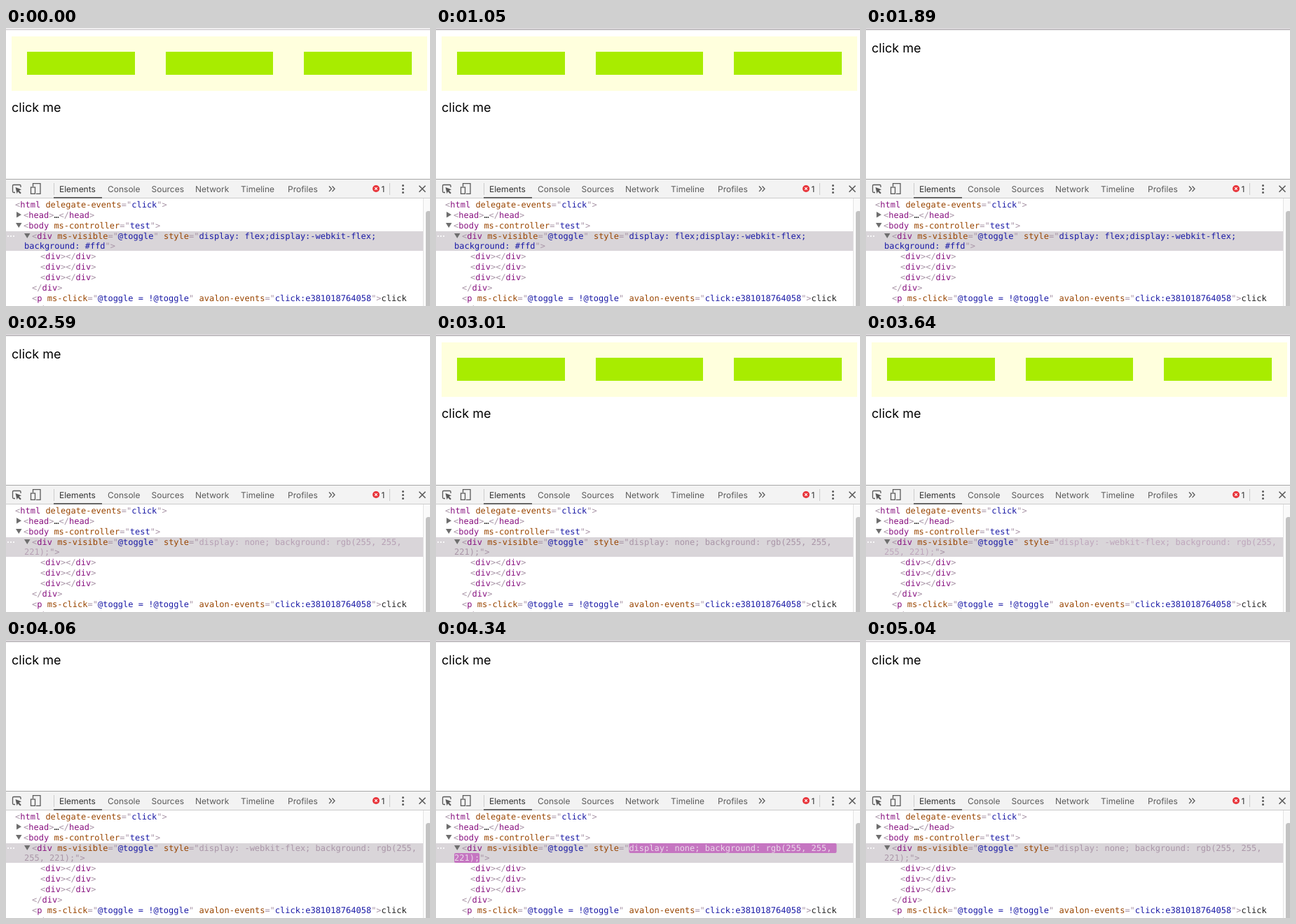
Animation, 605 px wide and 398 px high, one loop 5.11 s. Source, as an HTML page:

```html
<!DOCTYPE html>
<html lang="en">
<head>
<meta charset="utf-8">
<title>Toggle in the inspector</title>
<style>
  html, body { margin: 0; width: 100%; height: 100%; overflow: hidden; background: #fff; }
  svg { display: block; }
  text { white-space: pre; text-rendering: geometricPrecision; }
  .page { font: 18px Inter, sans-serif; fill: #000; }
  .tabs { font: 12px Inter, sans-serif; fill: #5a5a5a; }
  .code { font: 12px "DejaVu Sans Mono", monospace; fill: #222; }
  .b { fill: #a894a6; }
  .t { fill: #881280; }
  .n { fill: #994500; }
  .v { fill: #1a1aa6; }
  .icon { fill: none; stroke: #5a5a5a; stroke-width: 1.3; }
  .arrow { fill: #6e6e6e; }
</style>
</head>
<body>
<svg width="605" height="398" viewBox="0 0 605 398">
  <rect width="605" height="398" fill="#fff"/>
  <rect id="strip" width="605" height="2"/>
  <rect id="edge" y="2" width="605" height="1"/>

  <g id="box">
    <rect x="8" y="12" width="593" height="78" fill="#ffffdd"/>
    <path d="M30 34h154v33H30zM228 34h153v33H228zM425 34h154v33H425z" fill="#a8ec00"/>
  </g>
  <text id="label" class="page" x="8" y="120">click me</text>

  <rect y="216" width="605" height="28" fill="#f3f3f3"/>
  <rect y="216" width="605" height="1" fill="#a8a8a8"/>
  <rect y="243" width="605" height="1" fill="#cccccc"/>
  <rect x="68" y="242" width="69" height="2" fill="#666"/>
  <path d="M68.5 222v17M547.5 222v17" stroke="#ccc"/>
  <g class="icon">
    <path d="M13 235.5H11Q9.500 235.500 9.500 234V226Q9.500 224.500 11 224.500H19.500Q21 224.500 21 226V228"/>
    <path d="M38.500 227V222.700H49V237.300H43"/>
    <rect x="35.500" y="228" width="6" height="9.300"/>
    <path d="M461 226.500l3.500 3.800-3.500 3.800M465.500 226.500l3.500 3.800-3.500 3.800"/>
    <path d="M589.500 225.700l9 9M598.500 225.700l-9 9" stroke-width="1.600"/>
  </g>
  <path d="M13.500 228l8.500 3.200-3.400 1.500 3.200 3.300-1.500 1.500-3.300-3.300-1.400 3z" fill="#5a5a5a"/>
  <g fill="#5a5a5a">
    <circle cx="566.500" cy="225.500" r="1.500"/>
    <circle cx="566.500" cy="230.500" r="1.500"/>
    <circle cx="566.500" cy="235.500" r="1.500"/>
  </g>
  <circle cx="528" cy="230" r="5" fill="#e8343a"/>
  <path d="M526.200 228.200l3.600 3.600M529.800 228.200l-3.600 3.600" stroke="#fff" stroke-width="1.200"/>
  <g id="tabs" class="tabs"></g>

  <rect y="291" width="595" height="28" fill="#d9d5d9"/>
  <g id="flash"></g>
  <g fill="#fff">
    <circle cx="3" cy="298" r="1.100"/>
    <circle cx="7" cy="298" r="1.100"/>
    <circle cx="11" cy="298" r="1.100"/>
  </g>
  <path class="arrow" d="M15 263l7 4.200-7 4.200zM14 279h8.500l-4.250 7zM26 294h8.500l-4.250 7z"/>
  <g id="code" class="code"></g>
  <g id="style" class="code"></g>

  <rect x="595" y="244" width="10" height="154" fill="#fafafa"/>
  <rect x="595" y="244" width="1" height="154" fill="#e4e4e4"/>
  <rect x="599" y="262" width="8" height="150" rx="3.500" fill="#c2c2c2"/>
</svg>
<script>
const LOOP = 5110, CHAR = 7.224, STYLE_X = 37 + 33 * CHAR;
const $ = id => document.getElementById(id);
const esc = s => s.replace(/</g, "&lt;").replace(/>/g, "&gt;");
const span = (cls, s) => `<tspan class="${cls}">${esc(s)}</tspan>`;
const line = (x, y, body) => `<text x="${x}" y="${y}">${body}</text>`;
const open = name => span("b", "<") + span("t", name);
const close = name => span("b", "</") + span("t", name) + span("b", ">");
const end = span("b", ">");
const attr = (name, value) =>
  " " + span("n", name) + span("b", '="') + span("v", value) + span("b", '"');

$("tabs").innerHTML = [
  [76, "Elements"], [145, "Console"], [207.5, "Sources"], [270, "Network"],
  [335, "Timeline"], [402, "Profiles"], [535.5, "1"]
].map(([x, s], i) =>
  `<text x="${x}" y="235"${i % 6 ? "" : ' fill="#333"'}>${s}</text>`).join("");

const emptyDiv = open("div") + end + close("div");
$("code").innerHTML = [
  [13, 257, open("html") + attr("delegate-events", "click") + end],
  [25, 272, open("head") + end + "…" + close("head")],
  [25, 287, open("body") + attr("ms-controller", "test") + end],
  [37, 302, open("div") + attr("ms-visible", "@toggle") + " " + span("n", "style") + span("b", '="')],
  [49, 331, emptyDiv],
  [49, 346, emptyDiv],
  [49, 361, emptyDiv],
  [37, 376, close("div")],
  [37, 391, open("p") + attr("ms-click", "@toggle = !@toggle") +
    attr("avalon-events", "click:e381018764058") + end + "click"],
  [26, 406, "me" + close("p")]
].map(row => line(...row)).join("");

const FLEX = ["display: flex;display:-webkit-flex;", "background: #ffd"];
const NONE = ["display: none; background: rgb(255, 255, ", "221);"];
const WEBKIT = ["display: -webkit-flex; background: rgb(255, ", "255, 221);"];

// [start, value]
const boxSteps = [[0, true], [1890, false], [3010, true], [4060, false]];
const styleSteps = [[0, FLEX], [1960, NONE], [3080, WEBKIT], [4130, NONE]];
const barSteps = [[0, ["#efedef", "#cbc8cb"]], [1050, ["#d8d5d8", "#aeabae"]], [5040, ["#efedef", "#cbc8cb"]]];

// age of the updated value -> text colour
const ink = [
  [0, [255, 255, 255]], [210, [234, 218, 233]], [560, [190, 166, 188]],
  [700, [174, 154, 172]], [1120, [168, 148, 166]]
];

const at = (steps, t) => steps.filter(s => s[0] <= t).pop();

function inkAt(age) {
  const i = ink.findIndex(k => k[0] > age);
  if (i < 0) return ink[ink.length - 1][1];
  const [t0, a] = ink[i - 1], [t1, b] = ink[i];
  return a.map((c, j) => c + (b[j] - c) * (age - t0) / (t1 - t0));
}

let shown;
function showStyle(lines) {
  if (lines === shown) return;
  shown = lines;
  const [a, b] = lines;
  $("style").innerHTML = line(STYLE_X, 302, span("v", a)) +
    line(26, 316, span("v", b) + span("b", '">'));
  $("flash").innerHTML =
    `<rect x="${STYLE_X}" y="291" width="${a.length * CHAR}" height="14" rx="2"/>` +
    `<rect x="26" y="305" width="${b.length * CHAR}" height="14" rx="2"/>`;
}

function draw(now) {
  const t = Math.floor(now % LOOP / 70) * 70;
  const visible = at(boxSteps, t)[1];
  $("box").style.display = visible ? "" : "none";
  $("label").setAttribute("y", visible ? 120 : 35);

  const [strip, edge] = at(barSteps, t)[1];
  $("strip").style.fill = strip;
  $("edge").style.fill = edge;

  const [start, lines] = at(styleSteps, t);
  showStyle(lines);
  const age = t - start, fresh = start > 0;
  $("flash").style.fill = "rgb(186,60,180)";
  $("flash").style.opacity = fresh ? Math.max(0, 1 - age / 560) : 0;
  const color = fresh ? `rgb(${inkAt(age).map(Math.round)})` : "";
  document.querySelectorAll("#style .v").forEach(e => e.style.fill = color);
}

const begin = performance.now();
function tick() {
  draw(performance.now() - begin);
  requestAnimationFrame(tick);
}
tick();
</script>
</body>
</html>
```
